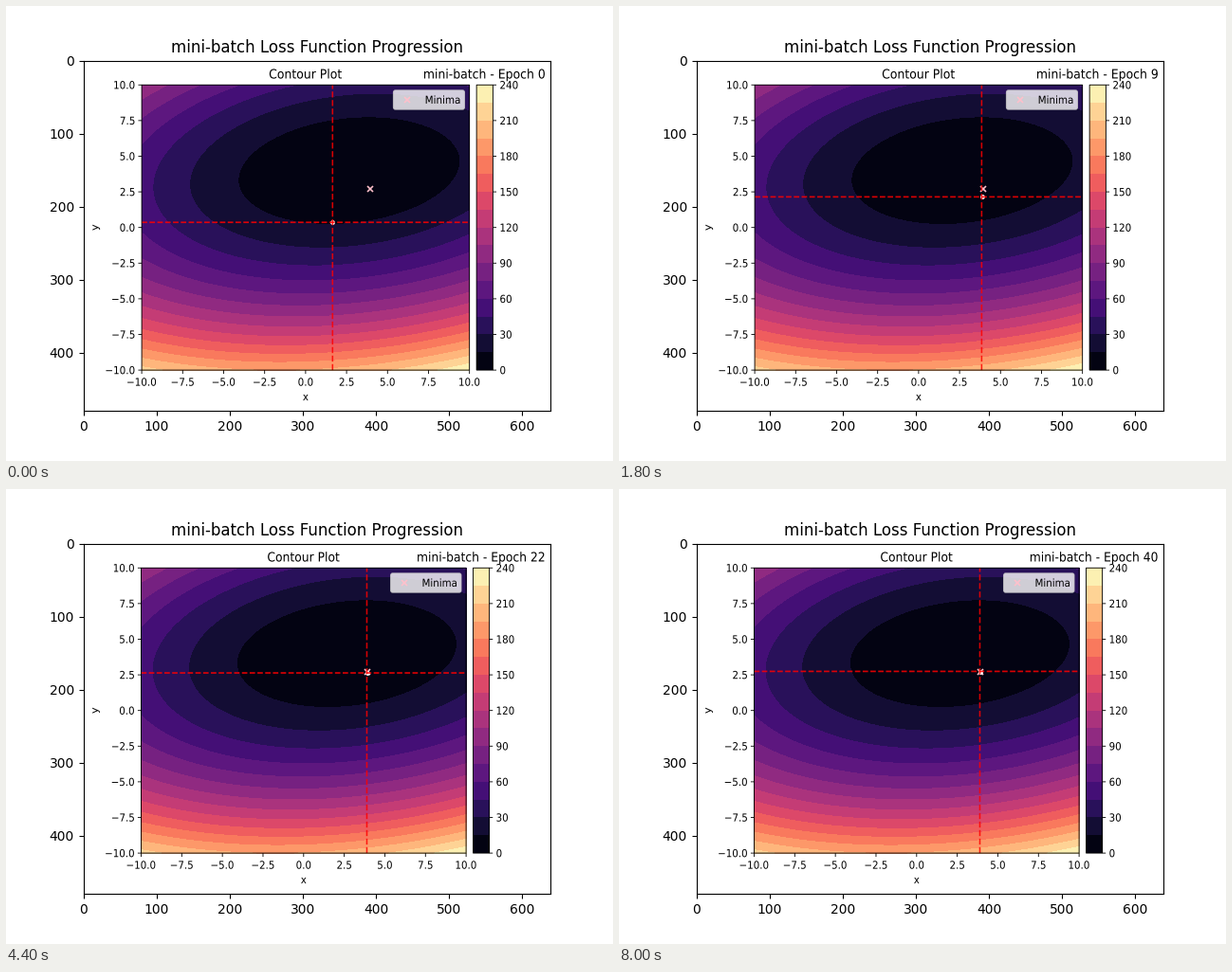
Recreate the animation shown at these times as a matplotlib script. Size 640 px wide and 480 px high, loop 8200 ms.

```python
import numpy as np
import matplotlib.pyplot as plt
from matplotlib.animation import FuncAnimation
from matplotlib.patches import FancyBboxPatch, PathPatch, Rectangle
from matplotlib.textpath import TextPath
from matplotlib.transforms import Affine2D

EPOCHS = 41
EM = 100 / 72                        # pixels per point
LEFT, BOTTOM, W, H = 80, 52.8, 462.86, 369.6
RIGHT, TOP = LEFT + W, BOTTOM + H
BAR, BAR_W = RIGHT + 10, 0.05 * W
SY, BASE = 0.814, 384.1              # vertical squash of the inner plot
STEP = 15
BANDS = 16

fig = plt.figure(figsize=(6.4, 4.8), dpi=100, facecolor="white")

# Outer image axes
outer = fig.add_subplot()
outer.set_aspect("equal")
outer.set(xlim=(-0.5, 639.5), ylim=(479.5, -0.5),
          xticks=range(0, 601, 100), yticks=range(0, 401, 100))
outer.set_title("mini-batch Loss Function Progression")

# Inner plot: data units are the pixels of a 640 x 480 figure
pic = fig.add_axes([0, 0, 1, 1], zorder=2)
pic.axis("off")
pic.set_ylim(BOTTOM - (480 - BASE) / SY, BOTTOM + BASE / SY)
pic.set_autoscale_on(False)


def set_layout(x0, sx):
    pic.set_xlim(LEFT - x0 / sx, LEFT + (640 - x0) / sx)


def label_path(x, y, text, pt, ha="center", rot=0):
    path = TextPath((0, 0), text, size=pt * EM)
    box = path.get_extents()
    dx = {"left": 0, "center": -(box.x0 + box.x1) / 2, "right": -box.x1}[ha]
    move = Affine2D().translate(dx, 0).rotate_deg(rot).translate(x, y)
    return move.transform_path(path)


def label(*args, **kw):
    patch = PathPatch(label_path(*args, **kw), fc="black", lw=0, zorder=5)
    return pic.add_patch(patch)


def stroke(xs, ys, **kw):
    style = dict(color="black", lw=0.62, solid_capstyle="butt",
                 snap=False, zorder=4)
    return pic.plot(xs, ys, **{**style, **kw})[0]


def frame(x, w):
    pic.add_patch(Rectangle((x, BOTTOM), w, H, fill=False, ec="black",
                            lw=0.65, snap=False, zorder=4))


def cross(x, y, z):
    pic.plot(x, y, "x", color="pink", ms=4.7, mew=1.17, zorder=z)


def dashes(start, length):
    """Dash ends along a line, split by nan."""
    a = np.arange(0, length, 5.3 * 1.5 * EM)
    b = np.minimum(a + 3.7 * 1.5 * EM, length)
    return start + np.column_stack([a, b, np.full_like(a, np.nan)]).ravel()


def loss(x, y):
    dx, dy = x - 2.66, y - 3.99
    return 0.9 + 0.317 * dx**2 + 1.021 * dy**2 - 0.2 * dx * dy


# Filled contours and colour bar
grid = np.linspace(-10, 10, 161)
gx, gy = np.meshgrid(grid, grid)
colors = plt.get_cmap("magma")((np.arange(BANDS) + 0.5) / BANDS)
pic.contourf(LEFT + (gx + 10) * W / 20, BOTTOM + (gy + 10) * H / 20,
             loss(gx, gy), levels=np.arange(BANDS + 1) * STEP,
             colors=colors, zorder=1)
for i, c in enumerate(colors):
    pic.add_patch(Rectangle((BAR, BOTTOM + i * H / BANDS), BAR_W, H / BANDS,
                            fc=c, lw=0, antialiased=False, zorder=1))
frame(LEFT, W)
frame(BAR, BAR_W)

# Ticks and labels
TICK = 3.5 * EM
for i, v in enumerate(np.arange(-10, 10.1, 2.5)):
    text = f"{v:.1f}".replace("-", "\u2212")
    x, y = LEFT + i * W / 8, BOTTOM + i * H / 8
    stroke([x, x], [BOTTOM - TICK, BOTTOM])
    stroke([LEFT - TICK, LEFT], [y, y])
    label(x, 32.5, text, 10)
    label(LEFT - 2 * TICK - 0.5, y - 5.1, text, 10, ha="right")
for i in range(9):
    y = BOTTOM + i * H / 8
    end = BAR + BAR_W
    stroke([end, end + TICK], [y, y])
    label(end + 2 * TICK - 0.3, y - 5.1, str(30 * i), 10, ha="left")
label(LEFT + W / 2, 13.5, "x", 10)
label(18.2, BOTTOM + H / 2, "y", 10, rot=90)
label(LEFT + W / 2, TOP + 6 * EM, "Contour Plot", 12)

# Legend
pic.add_patch(FancyBboxPatch(
    (435.4, 390.6), 100.5, 24.9, boxstyle="round,pad=0,rounding_size=2.78",
    fc="white", ec="0.8", alpha=0.8, lw=0.78, zorder=4))
cross(454.6, 403.2, 5)
label(479.9, 398.2, "Minima", 10, ha="left")

# Moving parts
cross(LEFT + 322.4, BOTTOM + 234.8, 2)
dot = pic.plot([], [], "o", color="white", ms=3.5, mew=0, zorder=2)[0]
red = dict(color="red", alpha=0.85, zorder=3)
h_x, v_y = dashes(LEFT, W), dashes(BOTTOM, H)
h_line = stroke(h_x, h_x * 0, lw=1.22, **red)
v_line = stroke(v_y * 0, v_y, lw=1.12, **red)
title = label(0, 0, "0", 12)


def position(n):
    """Descent path in plot pixels, with a faint batch wobble."""
    u = (322 - 51.6 * 0.635**n - 0.9 * 0.9**n
         + 0.1 * np.sin((n - 31) * np.pi / 8))
    v = 235.3 - 44 * 0.857**n
    return u, v


def update(n):
    if n < 10:
        set_layout(143.1, 0.7466)
    else:                            # wider title narrows the plot
        set_layout(142.5, 0.7402)
    u, v = position(n)
    dot.set_data([LEFT + u], [BOTTOM + v])
    h_line.set_ydata(np.full_like(h_x, BOTTOM + np.floor(v) + 0.5))
    v_line.set_xdata(np.full_like(v_y, LEFT + np.floor(u) + 0.5))
    title.set_path(label_path(564, TOP + 6 * EM,
                              f"mini-batch - Epoch {n}", 12))
    return dot, h_line, v_line, title


anim = FuncAnimation(fig, update, frames=EPOCHS, interval=200,
                     repeat=True, repeat_delay=0, blit=False)
plt.show()
```
